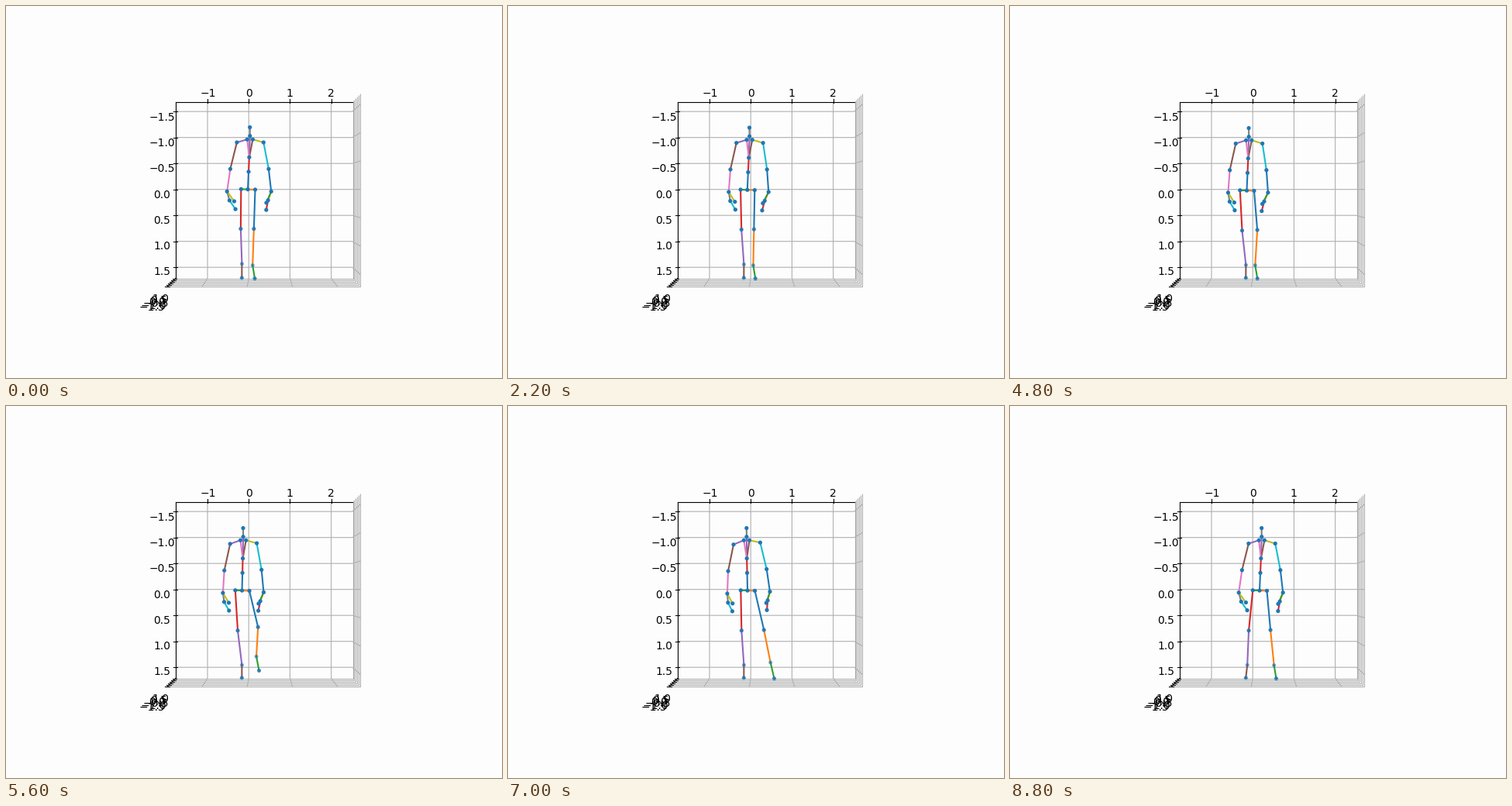
A matplotlib script for the animation above (9 s loop, 640 by 480 pixels).

```python
import numpy as np
import matplotlib.pyplot as plt
from matplotlib.animation import FuncAnimation
from matplotlib.collections import LineCollection

WIDTH, HEIGHT, DPI = 640, 480, 100
FRAMES, INTERVAL = 45, 200
PAPER, GRID = "#fdfdfd", "#b0b0b0"

# Perspective box seen straight on: camera distance, pixel scale, centre
DIST, SCALE = 10.0, 1998.0
CENTER = np.array([333.0, 237.4])
BOX = np.array([1.1905, 1.1905, 0.8929])
LOW = np.array([-1.768, -1.688, -1.58])
HIGH = np.array([2.512, 1.710, 1.2])
SPAN = HIGH - LOW

# Bones in the order of the colour cycle
BONES = [("pelvis", "spine"), ("pelvis", "hipR"), ("pelvis", "hipL"),
         ("spine", "chest"), ("chest", "neck"), ("chest", "collarR"),
         ("chest", "collarL"), ("neck", "head")]
for s in "RL":
    arm = ["collar" + s, "shoulder" + s, "elbow" + s, "wrist" + s, "hand" + s]
    BONES += list(zip(arm, arm[1:]))
    BONES += [("wrist" + s, "thumb" + s), ("hand" + s, "tip" + s)]
for s in "RL":
    leg = ["hip" + s, "knee" + s, "ankle" + s, "foot" + s]
    BONES += list(zip(leg, leg[1:]))

# Fingers relative to the wrist: hand, thumb, tip
FINGERS = {"R": [(-5, 11.4), (-7.4, 14.6), (-8.3, 23.8)],
           "L": [(2, 11.6), (8, 12.7), (8.6, 22.8)]}


def ease(frame, start, end):
    t = np.clip((frame - start) / (end - start), 0, 1)
    return t * t * (3 - 2 * t)


def bump(frame, peak, width):
    return np.exp(-((frame - peak) / width) ** 2)


def pose(frame):
    """Joint name to pixel position."""
    sway = (312 - 6 * ease(frame, 0, 4) + 2.8 * ease(frame, 4, 11)
            - 4.3 * ease(frame, 13, 29) + 17.5 * ease(frame, 31, 43))
    drop = 1.5 * ease(frame, 0, 24)
    swing = bump(frame, 33.5, 5)
    lean = 2.7 - 4.3 * swing
    start = np.exp(-frame / 2)
    spread = start + ease(frame, 35, 42)

    j = {"pelvis": np.array([sway, 236.6 + drop]),
         "chest": np.array([sway + 0.7 * lean, 195.2 + drop]),
         "head": np.array([sway + lean, 156.5 + 0.7 * drop])}
    j["spine"] = j["pelvis"] + 0.55 * (j["chest"] - j["pelvis"])
    j["neck"] = j["head"] + (0.1, 11.2)

    # Arms hang from the shoulders; right rises while left sinks in the swing
    reach = {"R": (17.6, 22.7 + 3.5 * swing + 1.5 * spread,
                   24.7 + 6 * swing + 2.8 * spread),
             "L": (16.8, 24.5 - 0.8 * swing + 0.8 * spread,
                   26.7 - 2 * swing + 2.8 * spread)}
    turn = {"R": 0.2 * swing + 0.08 * spread, "L": 0.1 * spread - 0.1 * swing}
    for side, sign in (("R", 1), ("L", -1)):
        j["collar" + side] = j["neck"] + (3.6 * sign, 4.5)
        j["hip" + side] = j["pelvis"] + (9.1 * sign + 0.4, 0.3 * sign)
        for part, dx, y in zip(("shoulder", "elbow", "wrist"), reach[side],
                               (176, 210.3, 239.3)):
            j[part + side] = np.array([j["head"][0] + sign * dx,
                                       y + drop - 1.4 * sign * swing])
        for part, (dx, dy) in zip(("hand", "thumb", "tip"), FINGERS[side]):
            j[part + side] = j["wrist" + side] + (dx + turn[side] * dy, dy)

    # Left foot stays planted, right foot takes one step
    j["footL"] = np.array([304.3, 350.8])
    j["ankleL"] = np.array([304.4 + 1.8 * ease(frame, 35, 43), 332.7 + drop])
    knee_x = 303.5 + 0.52 * (j["hipL"][0] - 304.5)
    j["kneeL"] = np.array([knee_x, 287.5 + 1.5 * drop])

    p = np.clip((frame - 24) / 11, 0, 1)
    lift = 4 * p * (1 - p)
    bend = bump(frame, 28.5, 5.5)
    foot_x = 319.2 + 1.8 * start + 24.3 * ease(frame, 24, 35)
    j["footR"] = np.array([foot_x, 351.6 - 11 * lift])
    j["ankleR"] = j["footR"] - (2.8 + 2.2 * swing, 17 + 4 * swing)
    knee_x = (j["hipR"][0] + j["ankleR"][0]) / 2 + 6.7 * bend
    j["kneeR"] = np.array([knee_x, 287.5 + drop - 4 * lift])
    return j


def project(point):
    """Data point (x, y, z) to stage pixels."""
    unit = ((np.asarray(point) - LOW) / SPAN - 0.5) * BOX
    return CENTER + unit[:2] * SCALE / (DIST + unit[2])


fig = plt.figure(figsize=(WIDTH / DPI, HEIGHT / DPI), dpi=DPI, facecolor=PAPER)
ax = fig.add_axes([0, 0, 1, 1])
ax.set_xlim(0, WIDTH)
ax.set_ylim(HEIGHT, 0)
ax.axis("off")

(x0, y0, z0), (x1, y1, z1) = LOW, HIGH
x_ticks = np.arange(-1, 3)
y_ticks = np.arange(-1.5, 1.6, 0.5)
z_ticks = np.arange(-1.5, 1.1, 0.5)


def draw_grid():
    lines = [[(x, y0, z1), (x, y1, z1), (x, y1, z0)] for x in x_ticks]
    lines += [[(x0, y, z1), (x1, y, z1), (x1, y, z0)] for y in y_ticks]
    lines += [[(x0, y1, z), (x1, y1, z), (x1, y0, z)] for z in z_ticks]
    paths = [[project(p) for p in line] for line in lines]
    ax.add_collection(LineCollection(paths, colors=GRID, linewidths=0.8, zorder=1))


def draw_line(a, b):
    xs, ys = zip(project(a), project(b))
    ax.plot(xs, ys, color="black", lw=0.8, zorder=1.5)


def draw_axis(axis, ticks, origin, tick_dir, digits):
    """One axis line with ticks and labels pushed away from the box."""
    end = np.where(np.arange(3) == axis, LOW + HIGH - origin, origin)
    draw_line(origin, end)
    step = np.zeros(3)
    step[tick_dir] = 0.08 * SPAN[tick_dir]
    push = np.sign(origin - (LOW + HIGH) / 2) * 0.083 * SPAN
    push[axis] = 0
    for value in ticks:
        at = np.array(origin, float)
        at[axis] = value
        draw_line(at + 0.1 * step, at - 0.2 * step)
        label = f"{value:.{digits}f}".replace("-", "\u2212")
        ax.text(*project(at + push), label, ha="center", va="top",
                fontsize=10, family="DejaVu Sans", zorder=1.6)


draw_grid()
draw_axis(0, x_ticks, np.array([x0, y0, z1]), 1, 0)
draw_axis(1, y_ticks, np.array([x0, y0, z1]), 0, 1)
draw_axis(2, z_ticks, np.array([x0, y1, z1]), 0, 1)

# Joints further from the viewer are paler
FADE = {"knee": 0.85, "ankle": 0.5, "foot": 0.75}
names = list(pose(0))
shades = [(0x1f / 255, 0x77 / 255, 0xb4 / 255, FADE.get(name[:-1], 1)) for name in names]

bones = LineCollection([], linewidths=1.5, capstyle="projecting", zorder=2,
                       colors=[f"C{i % 10}" for i in range(len(BONES))])
ax.add_collection(bones)
dots = ax.scatter(*np.transpose(list(pose(0).values())), s=5, c=shades,
                  linewidths=1.5, zorder=4)


def update(frame):
    joints = pose(frame)
    bones.set_segments([[joints[a], joints[b]] for a, b in BONES])
    dots.set_offsets([joints[name] for name in names])
    return bones, dots


anim = FuncAnimation(fig, update, frames=FRAMES, interval=INTERVAL,
                     repeat=True, repeat_delay=0, blit=False)
plt.show()
```
